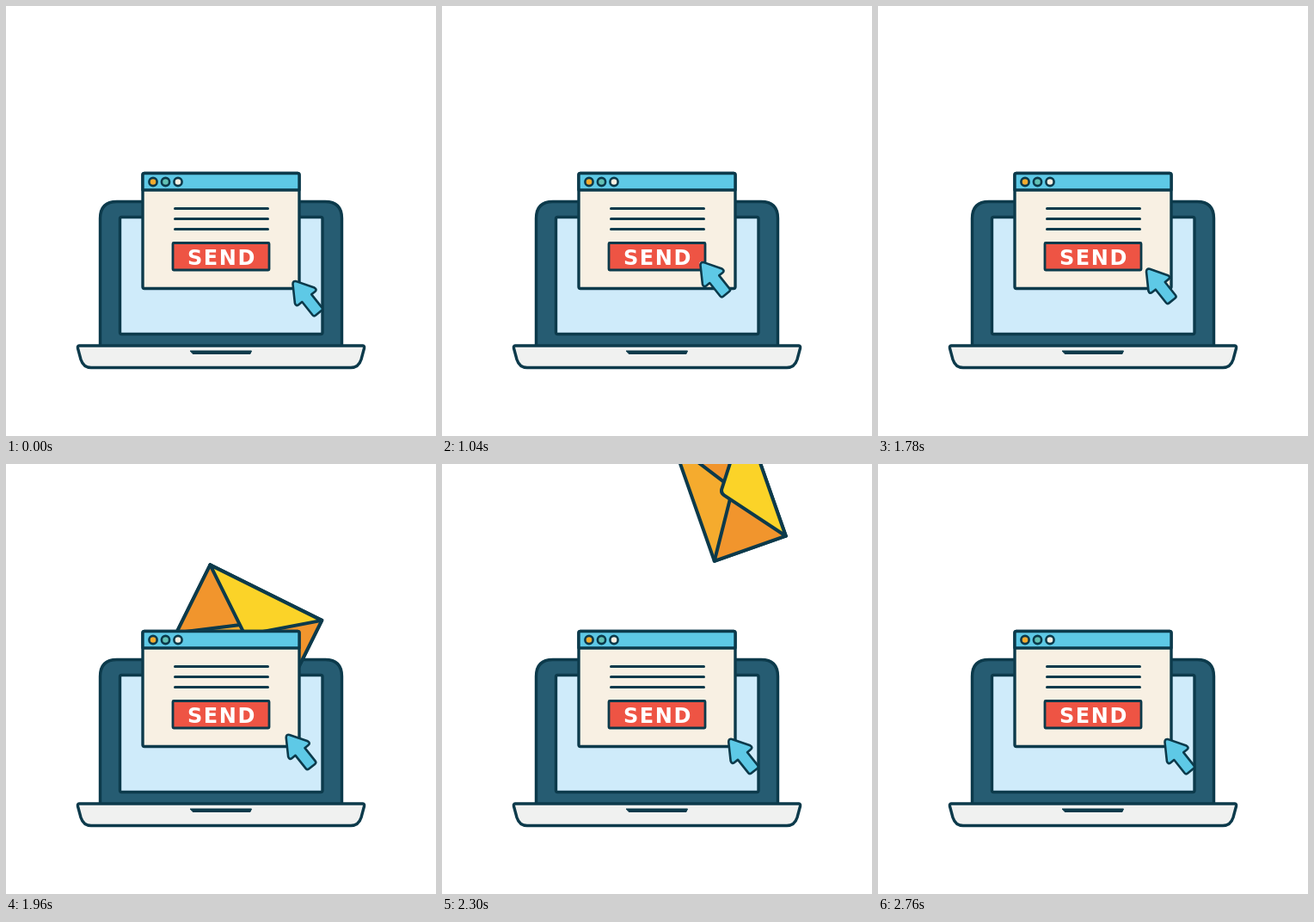
Recreate the animation shown at these times as an HTML page. Size 500 by 500 pixels, loop 3640 ms.

```html
<!DOCTYPE html>
<html lang="en">
<head>
<meta charset="utf-8">
<title>Send mail</title>
<style>
html, body { margin: 0; width: 100%; height: 100%; overflow: hidden; background: #fff; }
svg { display: block; width: 100%; height: 100%; }
text { font: 700 24px "DejaVu Sans", sans-serif; letter-spacing: 1.6px; text-anchor: middle; fill: #fff; stroke: none; }
</style>
</head>
<body>
<svg viewBox="0 0 500 500" stroke="#0c3a4b" stroke-width="3.400" stroke-linejoin="round" stroke-linecap="round">
  <g id="laptop">
    <path fill="#265c72" d="M109.5 400V247Q109.5 227.500 129 227.500H371Q390.500 227.500 390.500 247V400Z"/>
    <rect x="132.500" y="245.500" width="235.500" height="136" rx="2" fill="#cfebfa"/>
    <path fill="#f0f1f0" d="M85 395H415Q417 395 416.500 398L413 411Q410 420.500 401 420.500H99Q90 420.500 87 411L83.500 398Q83 395 85 395Z"/>
    <path fill="#0c3a4b" stroke-width="1" d="M214.500 401H285.500L284 404.500H217.500Z"/>
  </g>

  <g id="mail" stroke-width="4">
    <path fill="#f5ab2e" d="M-72.500 -44H72.500V44H-72.500Z"/>
    <path fill="#f1952d" d="M-72.500 -44L0 -4L-72.500 44ZM72.500 -44L0 -4L72.500 44Z"/>
    <path fill="#fbd328" d="M-72.500 -44H72.500L4 8Q0 11 -4 8Z"/>
  </g>

  <g id="window">
    <rect x="159" y="194.500" width="182" height="134" rx="2" fill="#f8f0e3"/>
    <path fill="#5ec9e6" d="M159 214V196.500Q159 194.500 161 194.500H339Q341 194.500 341 196.500V214Z"/>
    <g stroke-width="2.600">
      <circle cx="171" cy="204.500" r="4.600" fill="#f5ab2e"/>
      <circle cx="185.500" cy="204.500" r="4.600" fill="#62c1b4"/>
      <circle cx="200" cy="204.500" r="4.600" fill="#f8f0e3"/>
    </g>
    <path stroke-width="3" d="M196.500 235.500H304.500M196.500 247.500H304.500M196.500 259.500H304.500"/>
    <rect x="194" y="275.500" width="112" height="31.500" rx="1" fill="#ee5444" stroke-width="2.800"/>
    <text x="251" y="300.500">SEND</text>
  </g>

  <path id="rays" stroke="#fff" stroke-width="1.400" fill="none"/>
  <path id="cursor" fill="#5ec9e6" stroke-width="2.600"
    d="M1.500 -2.500Q-1.500 0 1.500 2.500L20.500 14.500Q24.500 16 24.500 12V7H44Q46.500 7 46.500 4.500V-4.500Q46.500 -7 44 -7H24.500V-12Q24.500 -16 20.500 -14.500Z"/>
</svg>
<script>
const LOOP = 3640;
const [mail, rays, cursor] = ['mail', 'rays', 'cursor'].map(id => document.getElementById(id));
const span = (t, from, to) => Math.min(1, Math.max(0, (t - from) / (to - from)));
const mix = (a, b, p) => a + (b - a) * p;
const sine = x => (1 - Math.cos(Math.PI * x)) / 2;

// Cubic Bezier easing with handles (a, 0) and (b, 1)
function ease(x, a, b) {
  let lo = 0, hi = 1;
  for (let i = 0; i < 20; i++) {
    const s = (lo + hi) / 2, r = 1 - s;
    if (3 * r * r * s * a + 3 * r * s * s * b + s ** 3 < x) lo = s; else hi = s;
  }
  return x >= 1 ? 1 : lo * lo * (3 - 2 * lo);
}

function place(el, x, y, angle) {
  el.setAttribute('transform', `translate(${x} ${y}) rotate(${angle})`);
}

function drawRays(x) {
  let d = '';
  if (x > 0 && x < 1) {
    const inner = 13 * x ** 5, outer = 13 * (1 - (1 - x) ** 2);
    for (let i = 0; i < 6; i++) {
      const a = (115 + 38 * i) * Math.PI / 180;
      const at = r => `${301 + r * Math.cos(a)} ${299 + r * Math.sin(a)}`;
      d += `M${at(inner)}L${at(outer)}`;
    }
  }
  rays.setAttribute('d', d);
}

function draw(t) {
  const near = ease(span(t, 0, 840), .33, .5) - ease(span(t, 1560, 2400), .33, .2);
  place(cursor, mix(334.5, 301.5, near), mix(320.5, 298.5, near), 51.5);

  drawRays(span(t, 1020, 1560));

  const fly = sine(span(t, 1580, 2635));
  place(mail, mix(252, 358.5, fly), mix(284, -45, fly), 91.5 * fly);
  mail.style.opacity = t < 1580 ? 0 : 1 - span(t, 2640, 2760);
}

const start = performance.now();
function tick() {
  draw((performance.now() - start) % LOOP);
  requestAnimationFrame(tick);
}
tick();
</script>
</body>
</html>
```
